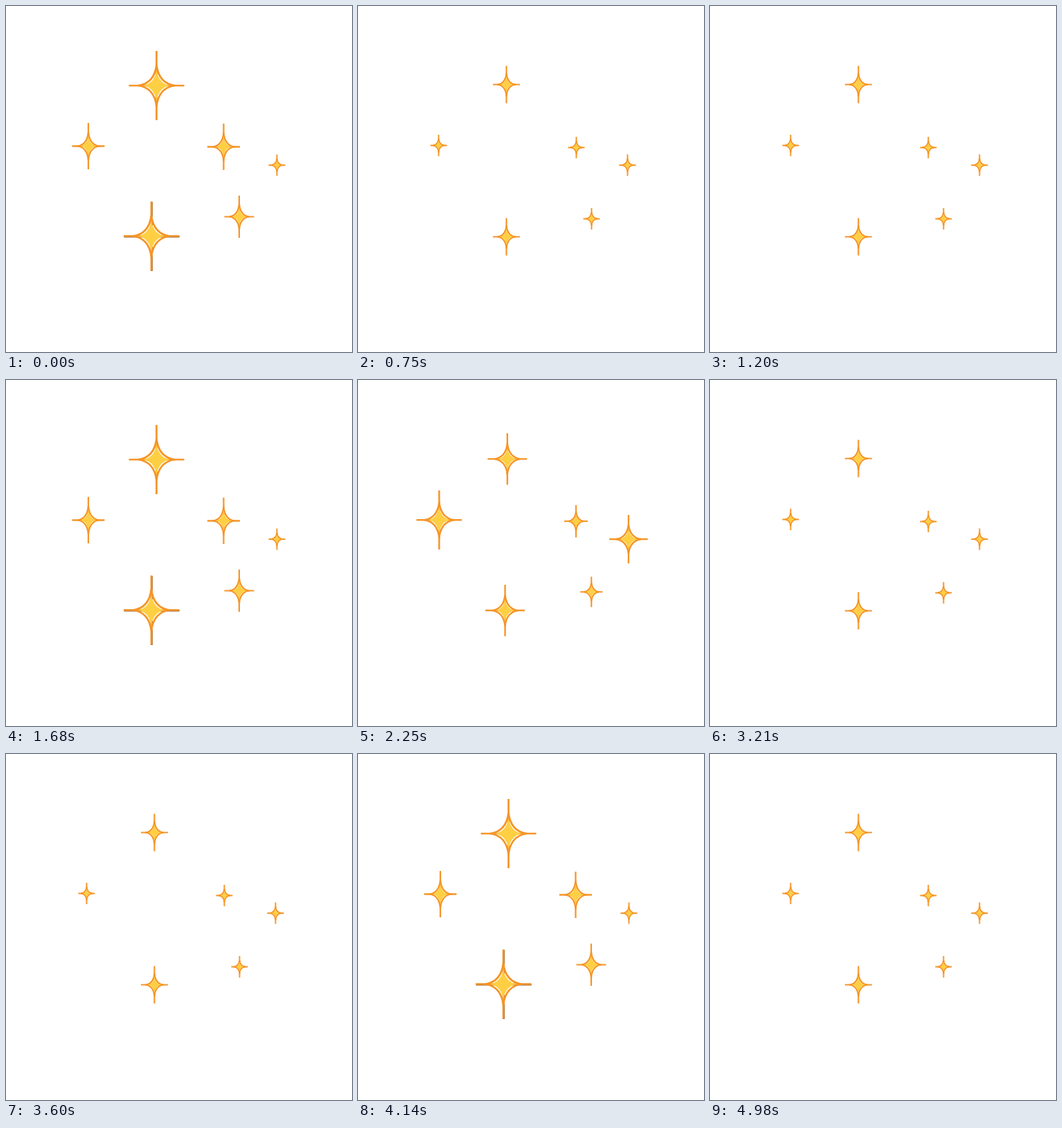
An HTML page with a canvas for the animation above (5010 ms loop, 500 px wide and 500 px high).

```html
<!DOCTYPE html>
<html>
<head>
<meta charset="utf-8">
<title>Sparkles</title>
<style>
  html, body { margin: 0; width: 100%; height: 100%; overflow: hidden; background: #fff; }
  canvas { display: block; }
</style>
</head>
<body>
<canvas id="stage" width="500" height="500"></canvas>
<script>
const ctx = document.getElementById('stage').getContext('2d');
const LOOP = 5010, STEP = 30, ACTIVE = 10;
const starts = [0, 420, 840, 1260, 1680, 2070, 2460, 2880, 3300, 3720, 4140, 4620];

// Poses are [x, y, half width, half height].
const stars = [
  { open: [217.5, 115, 40, 50], rest: [214.5, 113.5, 19.5, 27] },
  { open: [119, 202.5, 23.5, 33.5], rest: [116.5, 201.5, 12, 15.5], peak: [116, 202, 40, 50] },
  { open: [314.5, 203.5, 23.5, 33.5], rest: [315.5, 204.5, 12, 15.5] },
  { open: [391.5, 230, 12, 15.5], rest: [389.5, 230, 12, 15.5], peak: [390.5, 230, 40, 50] },
  { open: [337, 304.5, 21.5, 30.5], rest: [337.5, 307.5, 12, 15.5] },
  { open: [210, 332.5, 40, 50], rest: [214.5, 333.5, 19.5, 27], shade: true }
];

const mix = (a, b, t) => a.map((v, i) => v + (b[i] - v) * t);

function arms(w, h, color, width) {
  ctx.strokeStyle = color;
  ctx.lineWidth = width;
  ctx.beginPath();
  ctx.moveTo(-w, 0);
  ctx.lineTo(w, 0);
  ctx.moveTo(0, -h);
  ctx.lineTo(0, h);
  ctx.stroke();
}

function drawStar([x, y, w, h], shade) {
  const bw = w * 0.66, bh = h * 0.6, c = w * 0.08;
  const line = 1.6 + w * 0.028;
  ctx.save();
  ctx.translate(x, y);
  ctx.lineJoin = 'round';
  if (shade) {
    ctx.translate(0.6, 0.6);
    arms(w, h, '#8a5a2c', line);
    ctx.translate(-0.6, -0.6);
  }
  arms(w, h, '#f59529', line);
  ctx.beginPath();
  ctx.moveTo(0, -bh);
  ctx.quadraticCurveTo(c, -c, bw, 0);
  ctx.quadraticCurveTo(c, c, 0, bh);
  ctx.quadraticCurveTo(-c, c, -bw, 0);
  ctx.quadraticCurveTo(-c, -c, 0, -bh);
  ctx.stroke();
  // Fill over the outline's inner half keeps the core bright.
  ctx.scale(0.93, 0.93);
  ctx.fillStyle = '#ffcf43';
  ctx.beginPath();
  const fw = bw * 0.8, fh = bh * 0.8;
  ctx.moveTo(0, -fh);
  ctx.quadraticCurveTo(c, -c, fw, 0);
  ctx.quadraticCurveTo(c, c, 0, fh);
  ctx.quadraticCurveTo(-c, c, -fw, 0);
  ctx.quadraticCurveTo(-c, -c, 0, -fh);
  ctx.fill();
  ctx.restore();
}

function frame() {
  const time = performance.now() % LOOP;
  const start = starts.filter(s => s <= time).pop();
  const step = Math.floor((time - start) / STEP);
  const resting = step >= ACTIVE;
  const swing = Math.sin(Math.PI * step / (ACTIVE - 1)) ** 4;

  ctx.clearRect(0, 0, 500, 500);
  for (const { open, rest, peak = rest, shade } of stars) {
    const pose = resting ? rest : mix(open, peak, swing);
    drawStar(pose, shade && pose[2] > 35);
  }
  requestAnimationFrame(frame);
}
frame();
</script>
</body>
</html>
```
